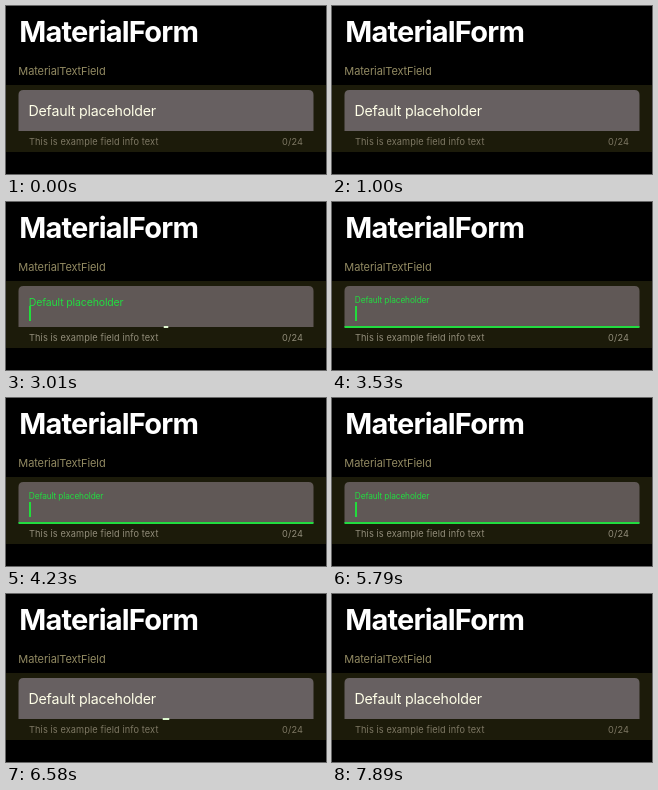
An HTML page that plays this animation: 320 by 168 pixels, repeating every 7990 ms.

```html
<!DOCTYPE html>
<html lang="en">
<head>
<meta charset="utf-8">
<title>MaterialForm</title>
<style>
  html, body { margin: 0; width: 100%; height: 100%; overflow: hidden; background: #000; }
  svg { display: block; width: 100vw; height: 100vh; font-family: Inter, Roboto, sans-serif; }
  .title { font-size: 29px; font-weight: 700; letter-spacing: -0.8px; fill: #fff; }
  .section { font-size: 11px; letter-spacing: -0.1px; fill: #928a62; }
  .label { font-size: 14.2px; letter-spacing: -0.2px; }
  .info { font-size: 9.2px; letter-spacing: 0.1px; }
</style>
</head>
<body>
<svg viewBox="0 0 320 168">
  <rect width="320" height="168" fill="#000"/>
  <text class="title" x="13.3" y="36">MaterialForm</text>
  <text class="section" x="12.3" y="68.7">MaterialTextField</text>
  <rect y="79" width="320" height="67" fill="#1c1b0a"/>
  <path id="field" d="M12.5 125V89q0-5 5-5H302.5q5 0 5 5V125Z"/>
  <rect id="line" y="124" height="2"/>
  <text id="label" class="label">Default placeholder</text>
  <rect id="caret" x="23" y="104" width="2" height="15" fill="#22dc3c"/>
  <g id="info" class="info">
    <text x="23" y="138.5">This is example field info text</text>
    <text x="297" y="138.5" text-anchor="end">0/24</text>
  </g>
</svg>
<script>
const LOOP = 7990, FOCUS = 2900, BLUR = 6260;
const WHITE = [255, 255, 232], GREEN = [34, 220, 64];
const [field, line, label, caret, info] =
  ['field', 'line', 'label', 'caret', 'info'].map(id => document.getElementById(id));

const progress = (t, start, length) => Math.min(1, Math.max(0, (t - start) / length));
const easeOut = p => 1 - (1 - p) ** 2;
const easeInOut = p => p < 0.5 ? 4 * p ** 3 : 1 - 4 * (1 - p) ** 3;
const mix = (a, b, p) => a + (b - a) * p;
const blend = (a, b, p) => `rgb(${a.map((v, i) => Math.round(mix(v, b[i], p)))})`;

// Rises from 0 to 1 on focus and falls back on blur.
const toggle = (t, ease, delay, length) =>
  ease(progress(t, FOCUS + delay, length)) - ease(progress(t, BLUR, length));

function draw(t) {
  const float = toggle(t, easeOut, 0, 290);
  const tint = toggle(t, easeOut, 0, 120);
  const grow = toggle(t, easeInOut, 50, 390);

  label.setAttribute('transform',
    `translate(${mix(22.5, 22.8, float)} ${mix(110, 100.7, float)}) scale(${mix(1, 0.585, float)})`);
  label.setAttribute('fill', blend(WHITE, GREEN, tint));
  field.setAttribute('fill', blend([103, 96, 97], [96, 88, 86], tint));
  info.setAttribute('fill', blend([126, 120, 100], [146, 141, 122], tint));

  const width = 295 * grow;
  line.setAttribute('x', 160 - width / 2);
  line.setAttribute('width', width);
  line.setAttribute('fill', blend([238, 250, 220], GREEN, Math.min(1, grow * 4)));

  const focused = t >= FOCUS + 40 && t < BLUR;
  const blinkOn = (t - FOCUS - 40) % 1200 < 700;
  caret.setAttribute('opacity', focused && blinkOn ? 1 : 0);
}

function frame() {
  draw(performance.now() % LOOP);
  requestAnimationFrame(frame);
}
frame();
</script>
</body>
</html>
```
